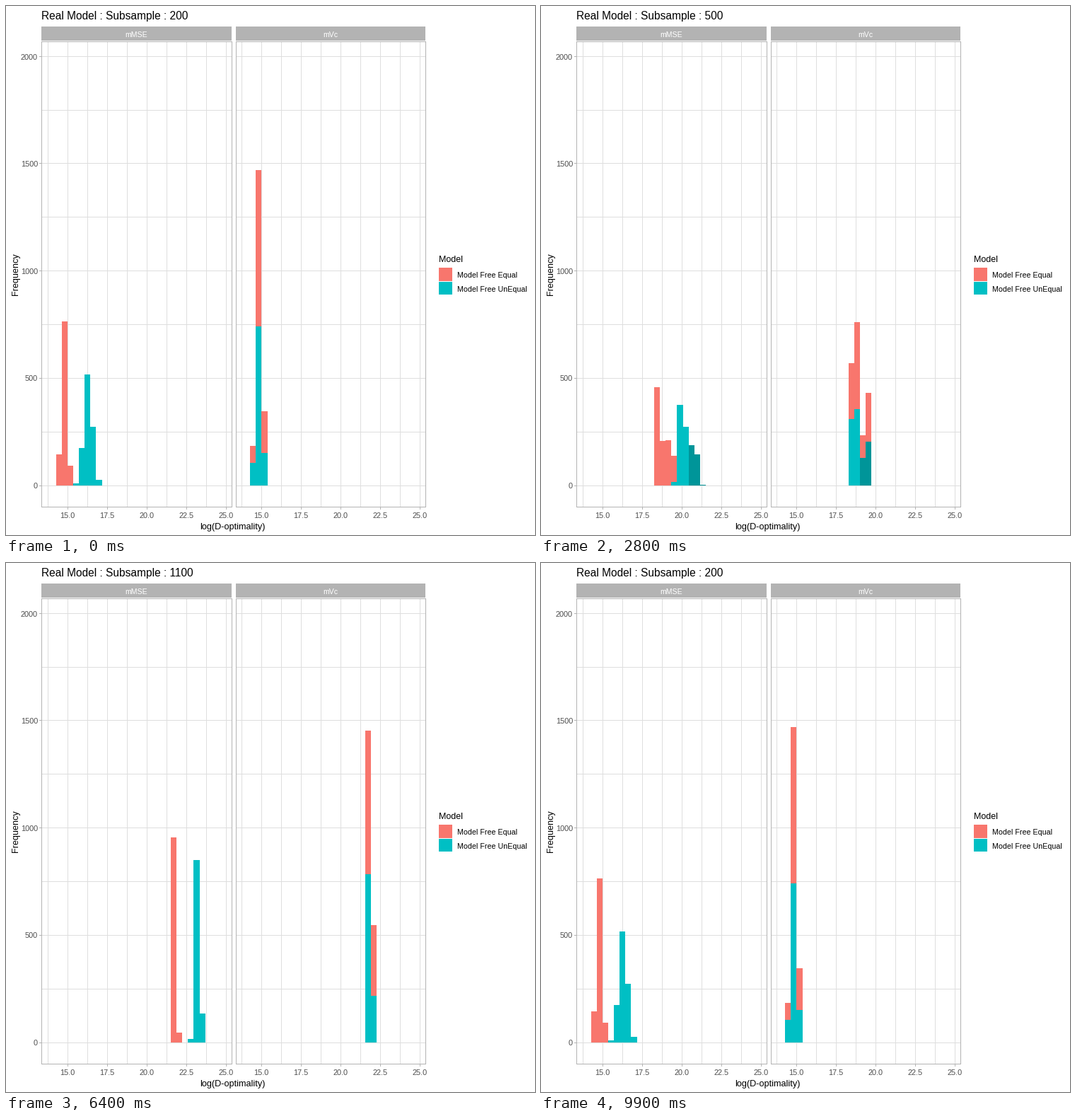
A matplotlib script that plays this animation: 748x748 px, repeating every 10000 ms.

```python
import math
from itertools import accumulate

import matplotlib.pyplot as plt
from matplotlib.animation import FuncAnimation
from matplotlib.collections import PolyCollection
from matplotlib.patches import Rectangle

SIZE = 748
FRAMES, INTERVAL = 100, 100
BINS, DRAWS = 30, 1000
RED, TEAL = (248 / 255, 118 / 255, 109 / 255), (0, 191 / 255, 196 / 255)
GRID, FRAME, TICK = "#dedede", "#b3b3b3", "#4d4d4d"
PANEL_SHIFT = 274.62

SAMPLES = range(200, 1600, 100)
HOLD = 4
STEPS = [4] * 3 + [3] * 3 + [2] + [3] * 7
STARTS = list(accumulate((s + HOLD for s in STEPS[:-1]), initial=HOLD))

# Mean in bins as a + b*t - c*t^2 with t = log(n / 200), then spread and its decay.
TRENDS = {
    ("mMSE", "equal"): (2.444, 11.485, 0.125, 0.418, 0.43),
    ("mMSE", "unequal"): (6.631, 11.264, 0.06, 0.70, 0.48),
    ("mVc", "equal"): (2.62, 11.55, 0.14, 0.44, 0.40),
    ("mVc", "unequal"): (2.55, 11.58, 0.16, 0.44, 0.40),
}


def bell_counts(n, a, b, c, spread, decay):
    t = math.log(n / 200)
    mean = a + b * t - c * t * t
    sd = spread * math.exp(-decay * t)
    cdf = [0.5 * (1 + math.erf((k - mean) / sd / math.sqrt(2))) for k in range(BINS + 1)]
    counts = [round(DRAWS * (hi - lo)) for lo, hi in zip(cdf, cdf[1:])]
    return [v if v > 2 else 0 for v in counts]


STATES = [{key: bell_counts(n, *trend) for key, trend in TRENDS.items()}
          for n in SAMPLES]


def x_bin(k, panel):
    return math.floor(63.02 + 8.118 * k + PANEL_SHIFT * panel)


def y_px(v):
    return round(678 - 0.3037 * v)


def phase(i):
    """Return the state left, the state entered and the progress between them."""
    past = [j for j, start in enumerate(STARTS) if start <= i]
    if not past:
        return 0, 1, 0.0
    j = past[-1]
    return j, (j + 1) % len(SAMPLES), min(1.0, (i - STARTS[j] + 1) / STEPS[j])


fig = plt.figure(figsize=(SIZE / 100, SIZE / 100), dpi=100, facecolor="white")
ax = fig.add_axes([0, 0, 1, 1])
ax.set_xlim(0, SIZE)
ax.set_ylim(SIZE, 0)
ax.axis("off")


def box(x0, y0, x1, y1, color, z=1):
    ax.add_patch(Rectangle((x0, y0), x1 - x0, y1 - y0, fc=color, lw=0,
                           antialiased=False, zorder=z))


def label(x, y, text, px, color="black", ha="left", **kw):
    return ax.text(x, y, text, fontsize=px * 0.72, color=color, ha=ha,
                   va="baseline", family="Liberation Sans", zorder=5, **kw)


def draw_panel(panel, name, left, right):
    top, bottom = 50, 708
    for v in range(0, 2001, 250):
        box(left, y_px(v), right, y_px(v) + 1, GRID)
    for k in range(10):
        x = int(59 + 28 * k + PANEL_SHIFT * panel)
        box(x, top, x + 1, bottom, GRID)
        if k % 2:
            box(x, bottom, x + 1, bottom + 4, FRAME)
            label(x - 0.3, 723.7, f"{15 + 1.25 * (k - 1):.1f}", 10.9, TICK, "center")
    for x in (left, right):
        box(x, top, x + 1, bottom + 1, FRAME, 4)
    for y in (top, bottom):
        box(left, y, right + 1, y + 1, FRAME, 4)
    box(left, 29, right, 49, FRAME)
    label((left + right) / 2, 44, name, 10.5, "white", "center")


draw_panel(0, "mMSE", 50, 319)
draw_panel(1, "mVc", 325, 593)
for v in range(0, 2001, 500):
    box(47, y_px(v), 50, y_px(v) + 1, FRAME)
    label(45, y_px(v) + 4.5, str(v), 10.9, TICK, "right")

label(320, 740, "log(D-optimality)", 12.65, ha="center")
label(17, 379, "Frequency", 12.65, ha="center", rotation=90, rotation_mode="anchor")
label(612, 362, "Model", 12.5)
box(612, 370, 631, 389, RED)
box(612, 390, 631, 408, TEAL)
label(638, 384, "Model Free Equal", 10.6)
label(638, 404, "Model Free UnEqual", 10.6)
title = label(50, 19, "", 15.5)

bars = PolyCollection([], linewidths=0, antialiaseds=False, zorder=3)
ax.add_collection(bars, autolim=False)


def update(i):
    a, b, p = phase(i)
    old, new = STATES[a], STATES[b]
    verts, colors = [], []

    def add(panel, k, low, high, color):
        y0, y1 = y_px(low), y_px(high)
        if y1 < y0:
            x0, x1 = x_bin(k, panel), x_bin(k + 1, panel)
            verts.append([(x0, y0), (x1, y0), (x1, y1), (x0, y1)])
            colors.append(color)

    for panel, name in enumerate(("mMSE", "mVc")):
        equal, unequal = (name, "equal"), (name, "unequal")
        for k in range(BINS):
            low = old[unequal][k] * (1 - p) + new[unequal][k] * p
            high = low + old[equal][k] * (1 - p) + new[equal][k] * p
            # Teal bars that grow from almost nothing start darker.
            entering = 10 * old[unequal][k] < new[unequal][k]
            shade = 1 - 0.33 * (1 - p) if entering else 1
            add(panel, k, 0, low, tuple(c * shade for c in TEAL))
            add(panel, k, low, high, RED)

    bars.set_verts(verts)
    bars.set_facecolor(colors)
    title.set_text(f"Real Model : Subsample : {SAMPLES[b if p > 0.5 else a]}")
    return bars, title


def start():
    return update(0)


anim = FuncAnimation(fig, update, frames=FRAMES, init_func=start,
                     interval=INTERVAL, repeat=True, repeat_delay=0, blit=False)
plt.show()
```
